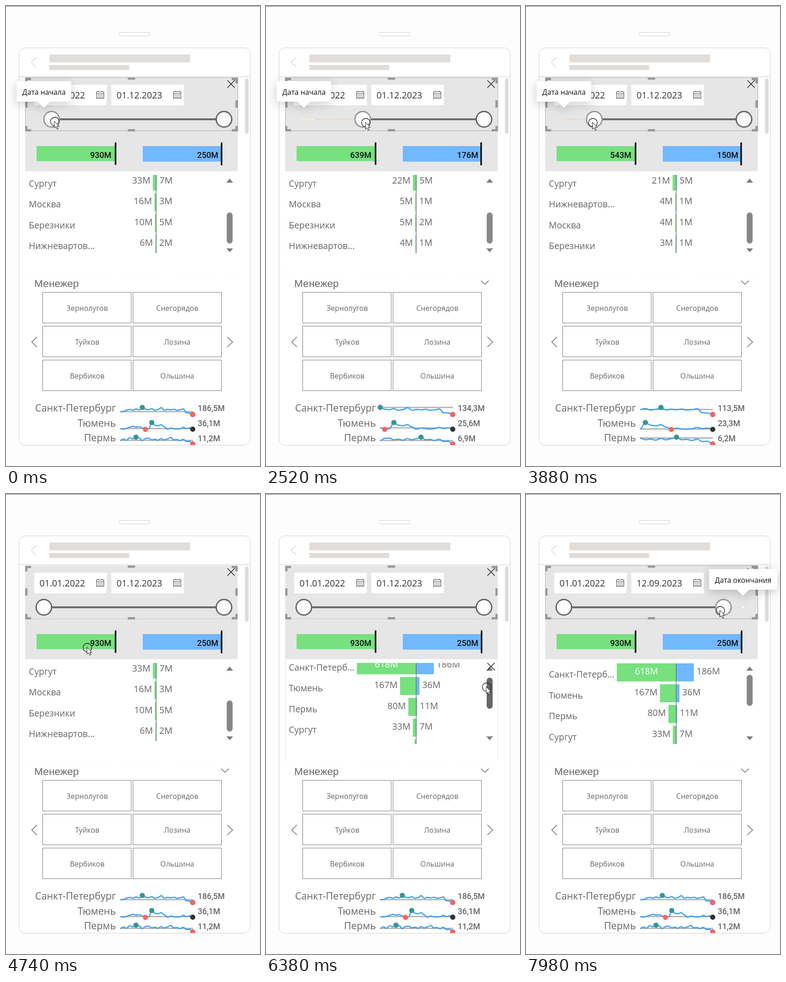
An HTML page with a canvas for the animation above (8000 ms loop, 557 by 1005 pixels).

```html
<!DOCTYPE html>
<html lang="ru">
<head>
<meta charset="utf-8">
<style>
html, body { margin: 0; width: 100%; height: 100%; overflow: hidden; background: #fdfdfd; }
canvas { display: block; }
</style>
</head>
<body>
<canvas id="stage" width="557" height="1005"></canvas>
<script>
const c = document.getElementById('stage').getContext('2d');
const UI = '"Open Sans", sans-serif', NUM = 'Roboto, sans-serif';
const GREEN = '#77e07f', BLUE = '#70b8ff', GREY = '#666';
const LOOP = 8000, TRACK0 = 83, TRACK1 = 478, DAYS = 699;

// Keys are [time, value...]; returns the interpolated n-th value.
function at(keys, t, n = 1) {
  let i = keys.findIndex(k => k[0] > t);
  if (i < 0) return keys[keys.length - 1][n];
  if (i === 0) return keys[0][n];
  const a = keys[i - 1], b = keys[i];
  return a[n] + (b[n] - a[n]) * (t - a[0]) / (b[0] - a[0]);
}

const startKeys = [[0, 100], [30, 102], [320, 126], [1050, 126], [1310, 163], [1760, 189], [2400, 190],
  [2520, 212], [2780, 235], [3670, 235], [3880, 150], [4180, TRACK0]];
const endKeys = [[7600, TRACK1], [7770, 462], [7980, 433]];
const gripKeys = [[3670, 7], [3880, -3]];
const scrollKeys = [[5870, 1], [6380, .11], [6630, 0]];
const cursorKeys = [[4360, 80, 255], [5110, 274, 414], [5170, 276, 415], [5660, 486, 475], [5870, 486, 475],
  [6380, 484, 422], [6630, 484, 417], [7000, 484, 417], [7500, 471, 255]];

const top3 = [['Санкт-Петерб...', 618, 186], ['Тюмень', 167, 36], ['Пермь', 80, 11]];
const S = 'Сургут', M = 'Москва', B = 'Березники', N = 'Нижневартов...';
const views = [
  { from: 0, scale: .21, totals: [930, 250], rows: [[S, 33, 7], [M, 16, 3], [B, 10, 5], [N, 6, 2]], sums: ['186,5M', '36,1M', '11,2M'] },
  { from: 3, scale: .245, totals: [814, 223], rows: [[S, 28, 6], [M, 12, 2], [B, 8, 4], [N, 6, 1]], sums: ['167,3M', '32,4M', '9,5M'] },
  { from: 7, scale: .31, totals: [639, 176], rows: [[S, 22, 5], [M, 5, 1], [B, 5, 2], [N, 4, 1]], sums: ['134,3M', '25,6M', '6,9M'] },
  { from: 9, scale: .36, totals: [543, 150], rows: [[S, 21, 5], [N, 4, 1], [M, 4, 1], [B, 3, 1]], sums: ['113,5M', '23,3M', '6,2M'] }
];

// Monthly values; the visible window is rescaled to its own range.
const trends = [
  { name: 'Санкт-Петербург', y: 878, high: 877, low: 892.5, v: [.4, .42, .62, .73, .6, .78, .65, 1, .75, .68, .82, .6, .7, .96, .6, .72, .66, .74, .6, .66, .78, .25, .2, 0] },
  { name: 'Тюмень', y: 911, high: 910, low: 925, v: [.12, .05, .15, .3, .45, .32, .38, .22, 0, .08, 1, .62, .52, .68, .35, .02, .2, .1, .05, .1, .3, .12, .22, .03] },
  { name: 'Пермь', y: 943.5, high: 942, low: 957, v: [.53, .75, .55, .92, .75, 1, .9, .5, .8, .85, .6, .7, .55, .78, .6, .75, .97, .6, .65, .5, .7, .35, .4, 0] }
];
const managers = ['Зернолугов', 'Снегорядов', 'Туйков', 'Лозина', 'Вербиков', 'Ольшина'];

function rect(x, y, w, h, color) { c.fillStyle = color; c.fillRect(x, y, w, h); }

function text(s, x, y, size, color = GREY, align = 'left', family = UI, weight = 400) {
  c.font = `${weight} ${size}px ${family}`;
  c.fillStyle = color;
  c.textAlign = align;
  c.fillText(s, x, y + size * .357);
}

function line(color, width, ...p) {
  c.strokeStyle = color;
  c.lineWidth = width;
  c.beginPath();
  for (let i = 0; i < p.length; i += 2) c.lineTo(p[i], p[i + 1]);
  c.stroke();
}

function poly(color, ...p) {
  c.fillStyle = color;
  c.beginPath();
  for (let i = 0; i < p.length; i += 2) c.lineTo(p[i], p[i + 1]);
  c.fill();
}

function round(x, y, w, h, r, fill, stroke) {
  c.beginPath();
  c.roundRect(x, y, w, h, r);
  if (fill) { c.fillStyle = fill; c.fill(); }
  if (stroke) { c.strokeStyle = stroke; c.lineWidth = 1; c.stroke(); }
}

function disc(x, y, r, fill, stroke, width) {
  c.beginPath();
  c.arc(x, y, r, 0, 7);
  if (fill) { c.fillStyle = fill; c.fill(); }
  if (stroke) { c.strokeStyle = stroke; c.lineWidth = width; c.stroke(); }
}

function clip(x, y, w, h, draw) {
  c.save();
  c.beginPath();
  c.rect(x, y, w, h);
  c.clip();
  draw();
  c.restore();
}

function cross(x, y) {
  line('#222', 1.6, x - 8, y - 8, x + 8, y + 8);
  line('#222', 1.6, x + 8, y - 8, x - 8, y + 8);
}

function phone() {
  rect(0, 0, 557, 1005, '#fdfdfd');
  rect(0, 0, 557, 1, '#666');
  round(248.5, 57.5, 68, 8, 4, '#fff', '#ccc');
  round(28.5, 91.5, 507, 868, 13, '#fff', '#d0d0d0');
  line('#d0d0d0', 1, 28, 154.5, 535, 154.5);
  line('#d8d8d8', 1.5, 67, 112, 55, 123, 67, 134);
  rect(95, 106, 309, 17, '#e1dcd8');
  rect(95, 129, 175, 11, '#e1dcd8');
  round(524, 158, 8, 121, 4, '#e1dcd8');
}

function dateBox(x, position) {
  const day = new Date(Date.UTC(2022, 0, 1) + Math.round((position - TRACK0) / (TRACK1 - TRACK0) * DAYS) * 864e5);
  rect(x, 172, 159, 45, '#fff');
  text(day.toISOString().slice(0, 10).split('-').reverse().join('.'), x + 11.5, 195.5, 19.6, '#333');
  const left = x + 136.5;
  c.strokeStyle = '#555';
  c.lineWidth = 1.2;
  c.strokeRect(left, 187.5, 16, 14);
  line('#555', 1, left, 191.5, left + 16, 191.5);
  line('#555', 1.2, left + 3.5, 185, left + 3.5, 188);
  line('#555', 1.2, left + 12.5, 185, left + 12.5, 188);
  for (let i = 0; i < 12; i++) rect(left + 2.5 + i % 4 * 3.2, 193.5 + (i >> 2) * 2.7, 1.7, 1.4, '#666');
}

function selection() {
  const k = '#999';
  for (const [x, dx] of [[42, 0], [508, -1]]) for (const [y, dy] of [[157, 0], [274, -1]]) {
    rect(x + dx * 13, y + dy * 5, 13, 5, k);
    rect(x + dx * 5, y + dy * 12, 5, 12, k);
  }
  rect(267, 156, 16, 5, k);
  rect(267, 269, 16, 5, k);
  rect(42, 206, 5, 16, k);
  rect(503, 206, 5, 16, k);
}

function panel(t, start, end, cursor) {
  rect(42, 156, 466, 205, '#e6e6e6');
  line('#ccc', 1, 42, 272.5, 508, 272.5);
  if (cursor.y < 273) {
    c.strokeStyle = '#aaa';
    c.lineWidth = 1;
    c.strokeRect(42.5, 156.5, 466, 116);
  }
  selection();
  cross(493.5, 170.5);
  dateBox(62, start);
  dateBox(231, end);

  if (start > 101) {
    line('#e6dcd6', 3, 80, 247.5, start - 17, 247.5);
    if (t < 3670) line('#f6efc2', 3, 80, 247.5, Math.min(107, start - 17), 247.5);
  }
  if (end < TRACK1) {
    line('#e6dfd8', 3, end + 17, 247.5, 478, 247.5);
    disc(476, 247.5, 2, '#fff');
  }
  line(GREY, 4, start, 247.5, end, 247.5);
  for (const x of [start, end]) {
    const hover = Math.hypot(cursor.x - x, cursor.y - 247.5) < 19;
    disc(x, 247.5, 17, '#fdfdfd', hover ? '#999' : GREY, 3);
  }
}

function totals([green, blue], shift) {
  rect(67, 306, 172, 33, GREEN);
  rect(300, 306, 171, 34, BLUE);
  rect(238.5, 298, 3.5, 49, '#111');
  rect(471 - shift, 298, 3.5, 50, '#111');
  text(green + 'M', 231, 325.5, 18, '#111', 'right', NUM, 500);
  text(blue + 'M', 465.5, 326, 18, '#111', 'right', NUM, 500);
}

function list(view, scroll, cursor, t) {
  const offset = -143 * scroll, axis = 329;
  clip(42, 369, 440, 177, () => {
    [...top3, ...view.rows].forEach(([name, green, blue], i) => {
      const y = 370 + i * 45.5 + offset;
      const g = Math.max(1.2, green * view.scale), b = Math.max(1, blue * view.scale);
      rect(axis - g, y, g, 39.5, GREEN);
      rect(axis, y, b, 39.5, BLUE);
      text(name, 50, y + 24.5, 19.4);
      if (g > 60) text(green + 'M', axis - g / 2, y + 17.5, 19.6, '#fff', 'center');
      else text(green + 'M', axis - g - 5.5, y + 17.5, 19.6, GREY, 'right');
      text(blue + 'M', axis + b + 6, y + 17.5, 19.6);
    });
    line('#666', 1.2, axis + .3, 370 + offset, axis + .3, 683 + offset);
  });

  const active = t > 4360 && cursor.y > 361;
  poly('#808080', 483, 386, 498, 386, 490.5, 377);
  poly('#808080', 483, 529.5, 498, 529.5, 490.5, 538);
  round(484, 395 + 56 * scroll, 13, 68, 6.5, active && cursor.x > 474 ? '#666' : '#888');
  if (active) {
    line('#e4e4e4', 1, 42.5, 362, 42.5, 581);
    line('#e4e4e4', 1, 507.5, 362, 507.5, 581);
    cross(493.5, 377);
  }
  for (let x = 42; x < 508; x += 20.8) rect(x, 581, 2, 1, '#d8d8d8');
}

function slicer(t) {
  text('Менежер', 62, 606, 22.8, GREY, 'left', '"Liberation Sans", sans-serif');
  if (t >= 650) line(GREY, 1.4, 472, 600, 480, 608, 488.5, 600);
  managers.forEach((name, i) => {
    const x = 81 + i % 2 * 197.5, y = 625.5 + (i >> 1) * 74;
    c.strokeStyle = '#777';
    c.lineWidth = 1;
    c.strokeRect(Math.floor(x) + .5 - (i % 2 ? 0 : 1), y, 194, 67);
    text(name, x + 97, y + 34.5, 16, GREY, 'center');
  });
  line(GREY, 1.4, 68, 723, 56.5, 734, 68, 745);
  line(GREY, 1.4, 485.5, 723, 497, 734, 485.5, 745);
}

function sparklines(view) {
  clip(28, 850, 507, 109, () => trends.forEach((trend, row) => {
    const v = trend.v.slice(view.from), last = v.length - 1;
    const max = Math.max(...v), min = Math.min(...v);
    const X = i => 250.5 + 159 * i / last;
    const Y = i => trend.low - (trend.low - trend.high) * (v[i] - min) / (max - min);
    text(trend.name, 241, trend.y, 21.7, GREY, 'right');
    text(view.sums[row], 420.5, trend.y + 1, 17.6, GREY, 'left', NUM, 500);
    line('#adadad', 2.6, 250, Y(0), 410, Y(0));
    c.strokeStyle = '#3a9df8';
    c.lineWidth = 2.6;
    c.beginPath();
    c.moveTo(X(0), Y(0));
    for (let i = 1; i <= last; i++) {
      const mid = (X(i - 1) + X(i)) / 2;
      c.bezierCurveTo(mid, Y(i - 1), mid, Y(i), X(i), Y(i));
    }
    c.stroke();
    const dot = (i, color) => disc(X(i), Y(i), 5.7, color);
    dot(last, '#333');
    dot(v.indexOf(max), '#349696');
    dot(v.indexOf(min), '#fd625e');
  }));
}

function tooltip(s, x, w, tip) {
  c.save();
  c.shadowColor = 'rgba(0,0,0,.2)';
  c.shadowBlur = 22;
  c.shadowOffsetY = 5;
  c.fillStyle = '#fff';
  c.beginPath();
  c.roundRect(x, 164, w, 45, 3);
  c.moveTo(tip - 14, 209);
  c.lineTo(tip, 222);
  c.lineTo(tip + 14, 209);
  c.fill();
  c.restore();
  text(s, x + w / 2, 188, 15.8, '#111', 'center');
}

function pointer({ x, y }) {
  disc(x, y, 9.5, null, '#222', 1.3);
  c.save();
  c.translate(x - 1, y - 1);
  c.beginPath();
  for (const [px, py] of [[0, 0], [0, 15], [3.5, 12], [6, 17.5], [8.5, 16.5], [6, 11], [10.5, 11]]) c.lineTo(px, py);
  c.closePath();
  c.fillStyle = '#fff';
  c.fill();
  c.strokeStyle = '#111';
  c.lineWidth = 1;
  c.stroke();
  c.restore();
}

function draw(t) {
  const start = at(startKeys, t), end = at(endKeys, t);
  const cursor = t < 4180 ? { x: start + at(gripKeys, t), y: t < 2250 ? 252.5 : 255 }
    : t > 7600 ? { x: end - 7, y: 255 }
    : { x: at(cursorKeys, t), y: at(cursorKeys, t, 2) };
  const step = t < 650 || t >= 4420 ? 0 : t < 1880 ? 1 : t < 2970 ? 2 : 3;
  const view = views[step];

  phone();
  panel(t, start, end, cursor);
  totals(view.totals, step ? 1 : 0);
  list(view, at(scrollKeys, t), cursor, t);
  slicer(t);
  sparklines(view);
  if (t < 4150) tooltip('Дата начала', 23.5, 119.5, 83);
  if (t > 7500) tooltip('Дата окончания', 401.5, 149.5, 476);
  pointer(cursor);
}

(function frame() {
  draw(performance.now() % LOOP);
  requestAnimationFrame(frame);
})();
</script>
</body>
</html>
```
